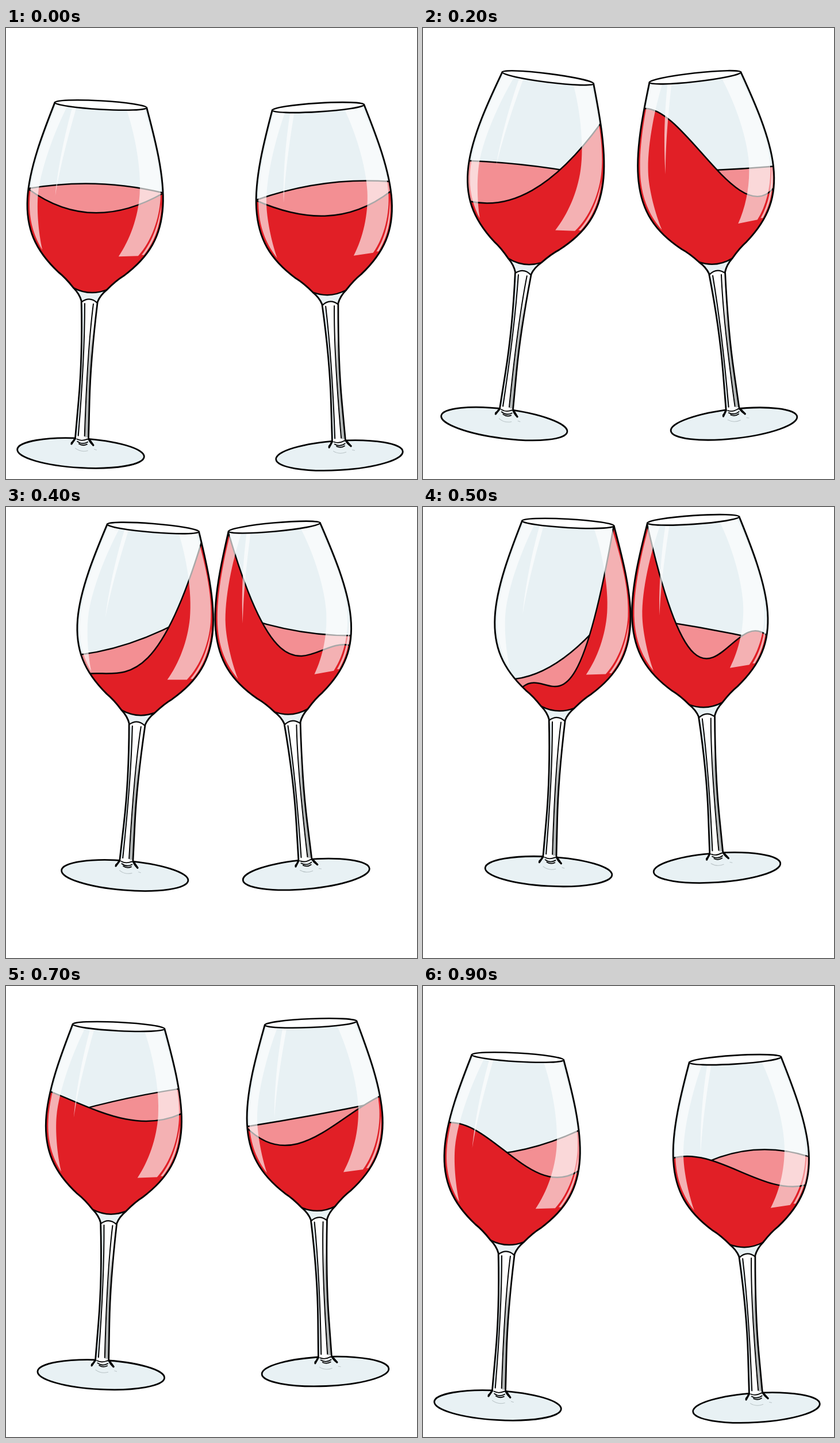
Write an HTML page with a canvas that moves like this. It is 715 px wide and 784 px high and loops after 1 s.

```html
<!DOCTYPE html>
<html lang="en">
<head>
<meta charset="utf-8">
<title>Cheers</title>
<style>
html, body { margin: 0; width: 100%; height: 100%; overflow: hidden; background: #fff; }
canvas { display: block; }
</style>
</head>
<body>
<canvas id="stage" width="715" height="784"></canvas>
<script>
const ctx = document.getElementById('stage').getContext('2d');
const INK = '#050505', GLASS = '#e8f1f4', WINE = '#e11f26', SURFACE = '#f38f93';
const STEP = 100, STEPS = 10;

// pose: step, foot x, foot y, tilt in degrees.
// wave: step, then heights above the foot from wall to wall,
//       four for the near edge of the wine and three for the far edge.
const left = {
  pose: [
    [0, 130, 739, 3.3], [2, 141.3, 688, 7.2], [3, 195, 647.5, 6.1], [5, 218.5, 633.5, 3.2],
    [6, 202, 620, 2.9], [7, 165.3, 675.7, 2.9], [8, 128, 705, 3.1], [9, 130, 729, 3.3]
  ],
  wave: [
    [0, 453, 421, 424, 459, 454, 469, 460],
    [2, 376, 388, 440, 539, 446, 451, 446],
    [3, 372, 383, 455, 570, 422, 449, 470],
    [5, 318, 322, 362, 607, 331, 382, 500],
    [6, 386, 384, 448, 559, 412, 447, 510],
    [7, 487, 460, 444, 460, 438, 475, 503],
    [9, 486, 458, 410, 415, 432, 441, 485]
  ]
};
const right = {
  pose: [
    [0, 580, 743, -3.5], [2, 541, 688, -6.4], [3, 533, 650, -6.6], [5, 511.5, 627, -3.9],
    [6, 526.5, 619.5, -2.4], [7, 555.5, 670, -2.4], [8, 574, 704, -3.1], [9, 580, 733, -3.5]
  ],
  wave: [
    [0, 451, 422, 420, 453, 452, 473, 470],
    [2, 562, 504, 412, 400, 455, 443, 437],
    [3, 605, 436, 378, 382, 510, 439, 424],
    [5, 604, 376, 384, 397, 445, 419, 388],
    [6, 558, 425, 432, 423, 470, 438, 422],
    [7, 428, 396, 429, 474, 431, 446, 464],
    [9, 442, 430, 394, 381, 404, 446, 430]
  ]
};

// Glass parts, measured from the centre of the foot.
const side = s => new Path2D(`M${80 * s} -606
  C${95 * s} -560 ${118 * s} -492 ${118 * s} -437
  C${118 * s} -385 ${100 * s} -348 ${57 * s} -312
  Q${44 * s} -303 ${29 * s} -286 Q${18 * s} -276 ${14 * s} -264`);
const leftSide = side(-1), rightSide = side(1);
const bowl = new Path2D(`M80 -606 C95 -560 118 -492 118 -437 C118 -385 100 -348 57 -312
  Q44 -303 29 -286 Q0 -273 -29 -286 Q-44 -303 -57 -312
  C-100 -348 -118 -385 -118 -437 C-118 -492 -95 -560 -80 -606 Q0 -596 80 -606Z`);
const neck = new Path2D('M-29 -286 Q0 -273 29 -286 Q18 -276 14 -262 L-14 -262 Q-18 -276 -29 -286Z');
const neckArc = new Path2D('M-29 -286 Q0 -273 29 -286');
const stemArc = new Path2D('M-14 -262 Q0 -274 14 -262');
const stem = new Path2D(`M-14 -263 C-9 -200 -7 -150 -9 -90 L-11 -27 Q0 -12 12 -27
  L10 -90 C8 -150 10 -200 14 -263 Q0 -274 -14 -263Z`);
const stemEdges = new Path2D(`M-14 -263 C-9 -200 -7 -150 -9 -90 L-11 -27 Q-12 -21 -17 -17
  M14 -263 C10 -200 8 -150 10 -90 L12 -27 Q14 -20 21 -15`);
const stemTint = new Path2D('M-13 -258 C-9 -200 -7 -150 -9 -90 L-10 -30 L-6 -30 C-5 -110 -3 -170 -8 -258Z');
const stemShade = new Path2D('M8 -215 C8 -150 9 -120 10 -90 L12 -28 L6 -28 C5 -80 3 -150 8 -215Z');
const stemLines = new Path2D('M-8 -260 C-4 -190 -4 -110 -6 -30 M7 -260 C2 -190 3 -110 5 -30');
const ribs = new Path2D('M-8 -24 Q0 -20 10 -25 M-7 -20 Q2 -14 11 -20 M-4 -16 Q3 -12 10 -16');
const faint = new Path2D('M-10 -8 Q0 -1 12 -5 M23 -8 L27 -7');
const hooks = new Path2D('M-11 -25 L-17 -15 M13 -25 L21 -15');
const shine = new Path2D(`M-77 -603 C-92 -560 -114 -490 -114 -437 C-114 -400 -103 -372 -87 -349
  C-96 -380 -101 -420 -100 -445 C-98 -490 -78 -555 -58 -601Z
  M-49 -600 C-58 -560 -68 -500 -70 -444 C-64 -500 -51 -560 -42 -600Z
  M45 -601 C62 -560 77 -500 76.5 -455 C76 -415 64 -375 46 -345 L80 -348
  C102 -375 113 -415 113 -450 C113 -500 92 -560 76 -603Z
  M86 -350 C105 -376 113 -410 115 -440 C116 -405 108 -376 90 -350Z`);
const ellipse = (y, rx, ry) => {
  const p = new Path2D();
  p.ellipse(0, y, rx, ry, 0, 0, Math.PI * 2);
  return p;
};
const foot = ellipse(0, 110.5, 25.5), rim = ellipse(-606, 80, 7.5);

function fill(path, color) {
  ctx.fillStyle = color;
  ctx.fill(path);
}

function line(path, width, color = INK) {
  ctx.lineWidth = width;
  ctx.strokeStyle = color;
  ctx.stroke(path);
}

// Values of a keyed track at a step.
function at(track, step) {
  let i = track.length - 1;
  while (track[i][0] > step) i--;
  const a = track[i], b = track[i + 1] || a;
  const k = a === b ? 0 : (step - a[0]) / (b[0] - a[0]);
  return a.slice(1).map((v, j) => v + (b[j + 1] - v) * k);
}

// Inner radius of the bowl at a height.
const radius = h => h > 437
  ? 118 - 38 * ((h - 437) / 169) ** 1.6
  : 118 - 60 * ((437 - h) / 123) ** 2.4;

// Polynomial surface through evenly spaced heights, from wall to wall.
function surface(h, color) {
  const last = h[h.length - 1], x0 = -radius(h[0]), x1 = radius(last);
  const x = k => x0 + (x1 - x0) * k;
  const edge = new Path2D(), body = new Path2D();
  edge.moveTo(x0, -h[0]);
  if (h.length === 3) {
    edge.quadraticCurveTo(x(1 / 2), (h[0] + last) / 2 - 2 * h[1], x1, -last);
  } else {
    const c1 = (-5 * h[0] + 18 * h[1] - 9 * h[2] + 2 * last) / 6;
    const c2 = (2 * h[0] - 9 * h[1] + 18 * h[2] - 5 * last) / 6;
    edge.bezierCurveTo(x(1 / 3), -c1, x(2 / 3), -c2, x1, -last);
  }
  body.addPath(edge);
  for (const [px, py] of [[130, -last], [130, 0], [-130, 0], [-130, -h[0]]]) body.lineTo(px, py);
  fill(body, color);
  line(edge, 2.5);
}

function drawStem() {
  fill(stem, '#fff');
  fill(stemTint, '#e3ecf0');
  fill(stemShade, '#b4b8b8');
  line(stemLines, 2);
  line(stemEdges, 2.8);
  line(stemArc, 2.2);
  line(hooks, 3.2);
  line(ribs, 1.8);
  line(faint, 1, '#b9c3c6');
}

function drawGlass({ pose, wave }, step) {
  const [x, y, tilt] = at(pose, step), heights = at(wave, step);
  ctx.save();
  ctx.translate(x, y);
  ctx.rotate(tilt * Math.PI / 180);

  fill(foot, GLASS);
  line(foot, 2.8);

  fill(bowl, GLASS);
  ctx.save();
  ctx.clip(bowl);
  surface(heights.slice(4), SURFACE);
  surface(heights.slice(0, 4), WINE);
  fill(shine, 'rgba(255,255,255,.65)');
  ctx.restore();

  fill(neck, GLASS);
  line(neckArc, 2.5);
  drawStem();
  line(leftSide, 2.9);
  line(rightSide, 2.9);
  fill(rim, '#fff');
  line(rim, 2.6);
  ctx.restore();
}

function frame(now) {
  const step = Math.floor(now / STEP) % STEPS;
  ctx.fillStyle = '#fff';
  ctx.fillRect(0, 0, 715, 784);
  drawGlass(left, step);
  drawGlass(right, step);
}

ctx.lineCap = ctx.lineJoin = 'round';
let start;
function tick(now) {
  start ??= now;
  frame(now - start);
  requestAnimationFrame(tick);
}
frame(0);
requestAnimationFrame(tick);
</script>
</body>
</html>
```
